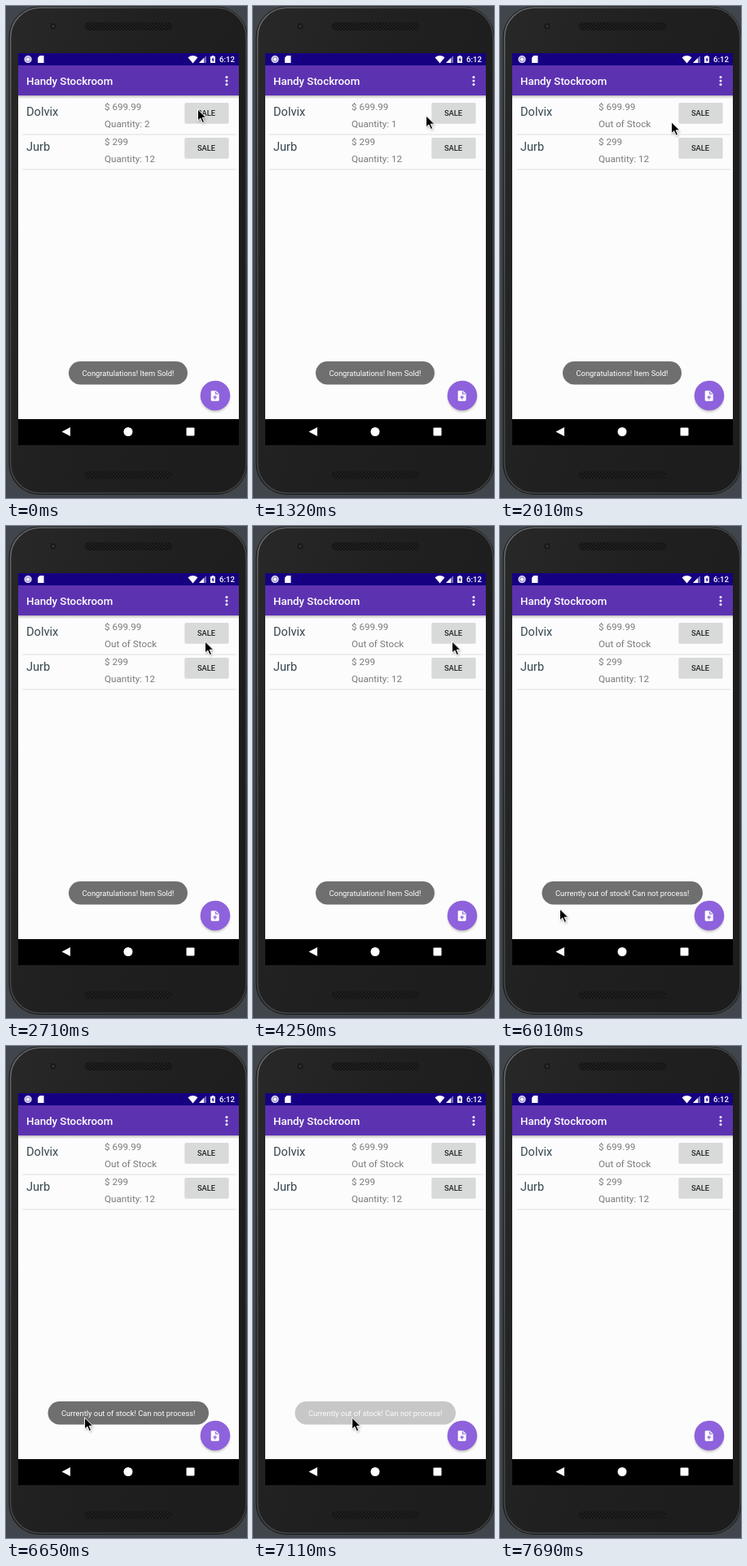
Recreate the animation shown at these times as an HTML page. Size 296x605 px, loop 8280 ms.

```html
<!DOCTYPE html>
<html lang="en">
<meta charset="utf-8">
<title>Inventory demo</title>
<style>
  html, body { margin: 0; width: 100%; height: 100%; overflow: hidden; background: #40464b; }
  svg { display: block; width: 296px; height: 605px; font-family: Roboto, sans-serif; }
  .name { font-size: 14.6px; fill: #37474f; }
  .detail { font-size: 11.7px; fill: #7a7a7a; }
  .sale { font-size: 9.3px; font-weight: 500; fill: #222; text-anchor: middle; }
  .toast text { font-size: 9.4px; fill: #fff; text-anchor: middle; }
  .toast rect { fill: #6f6f6f; }
</style>
<svg viewBox="0 0 296 605">
  <defs>
    <pattern id="mesh" width="4" height="4" patternUnits="userSpaceOnUse">
      <path d="M0 0h4v4h-4z" fill="#131313"/>
      <path d="M0 0l4 4M4 0l-4 4" stroke="#232323" stroke-width=".8"/>
    </pattern>
    <linearGradient id="shade" x2="0" y2="1">
      <stop stop-color="#000" stop-opacity=".24"/>
      <stop offset="1" stop-color="#000" stop-opacity="0"/>
    </linearGradient>
    <linearGradient id="rim" x2="1" y2="1">
      <stop stop-color="#6a6c6d"/>
      <stop offset=".3" stop-color="#48494a"/>
      <stop offset="1" stop-color="#3c3d3e"/>
    </linearGradient>
    <linearGradient id="body" x2="1" y2=".5">
      <stop stop-color="#282828"/>
      <stop offset=".5" stop-color="#202020"/>
      <stop offset="1" stop-color="#1d1d1d"/>
    </linearGradient>
    <filter id="soft" x="-50%" y="-50%" width="200%" height="200%"><feGaussianBlur stdDeviation="1.6"/></filter>
  </defs>

  <!-- phone -->
  <rect x="3.5" y=".5" width="293" height="600.5" rx="38" fill="#191919"/>
  <rect x="5.5" y="2" width="289.5" height="597" rx="36.5" fill="url(#body)" stroke="url(#rim)" stroke-width="1.6"/>
  <circle cx="58" cy="25" r="4.5" fill="#191919" stroke="#2c2c2c"/>
  <circle cx="58" cy="25" r="1.7" fill="#343434"/>
  <rect x="97" y="20.5" width="107" height="9" rx="4.5" fill="url(#mesh)" stroke="#191919"/>
  <rect x="97" y="572.5" width="107" height="8.5" rx="4.2" fill="url(#mesh)" stroke="#191919"/>

  <!-- screen -->
  <path d="M15 58h271v482h-271z" fill="#000"/>
  <path d="M15 73h271v435h-271z" fill="#fcfcfc"/>
  <path d="M15 58h271v15h-271z" fill="#160082"/>
  <path d="M15 73h271v37h-271z" fill="#5c32b1"/>
  <path d="M15 110h271v4h-271z" fill="url(#shade)"/>

  <g fill="#fff">
    <!-- status bar -->
    <circle cx="27" cy="65.5" r="4" fill="#a9a3d3" stroke="#f1effa" stroke-width="1.2"/>
    <circle cx="27" cy="65.5" r="1.8"/>
    <path d="M41.5 61h5v9h-7.5v-6.5z"/>
    <path d="M223.500 63.300q6-4.600 12 0l-6 7.200z"/>
    <path d="M246 61v9h-9z" opacity=".4"/>
    <path d="M243 64v6h-6z"/>
    <path d="M252.700 61h2.600v1h1.700v8h-6v-8h1.700z"/>
    <path d="M254.700 62.800l-2.300 3.700h1.400v2.700l2-3.600h-1.300z" fill="#160082"/>
    <text x="262" y="69" font-size="9.700" font-weight="500">6:12</text>
    <!-- toolbar -->
    <text x="25" y="97" font-size="13.300" font-weight="500">Handy Stockroom</text>
    <circle cx="271" cy="87.500" r="1.500"/>
    <circle cx="271" cy="92" r="1.500"/>
    <circle cx="271" cy="96.500" r="1.500"/>
    <!-- navigation -->
    <path d="M79 518v11l-10.500-5.500z"/>
    <circle cx="150" cy="523.500" r="5.500"/>
    <rect x="221.500" y="518.500" width="10" height="10" rx="1"/>
  </g>

  <g id="rows"></g>
  <g id="toasts"></g>

  <!-- add button -->
  <circle cx="257" cy="481.5" r="17.500" opacity=".25" filter="url(#soft)"/>
  <circle cx="257" cy="479" r="18.300" fill="#8e62dc"/>
  <path d="M253 473h5l3.700 3.700v7.800q0 1.300-1.300 1.300h-7.400q-1.300 0-1.300-1.300v-10.200q0-1.300 1.300-1.300z" fill="#fff"/>
  <path d="M257.700 473.800v3.200h3.200M256.700 478.700v5M254.200 481.200h5" fill="none" stroke="#8e62dc" stroke-width="1.200"/>

  <g id="cursor">
    <path d="M1 2v14l3.300-3 2.400 5.300 2.300-1-2.300-5.200h4.600z" opacity=".3" filter="url(#soft)"/>
    <path d="M0 0v14l3.300-3 2.400 5.500 2.400-1-2.400-5.300h4.600z" stroke="#fff"/>
  </g>
</svg>
<script>
  const LOOP = 8280;
  const byId = id => document.getElementById(id);

  const row = (y, name, price, quantity) => `
    <text class="name" x="25" y="${y + 25}">${name}</text>
    <text class="detail" x="121" y="${y + 18}">$ ${price}</text>
    <text class="detail quantity" x="121" y="${y + 39}">${quantity}</text>
    <rect x="219.5" y="${y + 9.5}" width="54" height="25.5" rx="1.5" fill="#000" opacity=".1"/>
    <rect x="219.5" y="${y + 9}" width="54" height="25" rx="1.5" fill="#d8d9d9"/>
    <text class="sale" x="246" y="${y + 25}">SALE</text>
    <path d="M20 ${y + 48}h263" stroke="#eee" stroke-width="2"/>`;

  const toast = (x, width, message) => `
    <g class="toast">
      <rect x="${x}" y="437" width="${width}" height="28.5" rx="14.25"/>
      <text x="${x + width / 2}" y="455">${message}</text>
    </g>`;

  byId("rows").innerHTML =
    row(110, "Dolvix", "699.99", "Quantity: 2") + row(153, "Jurb", "299", "Quantity: 12");
  byId("toasts").innerHTML =
    toast(77, 146, "Congratulations! Item Sold!") +
    toast(51.5, 197.5, "Currently out of stock! Can not process!");

  const stock = document.querySelector(".quantity");
  const [sold, empty] = document.querySelectorAll(".toast");
  const cursor = byId("cursor");

  // Pointer path: time, x, y of the tip
  const path = [
    [0, 235.5, 127], [60, 235, 128], [350, 235, 128], [560, 222, 143], [1040, 173, 152],
    [1150, 173, 152], [1320, 212.5, 135], [1550, 239, 133], [1670, 239, 133],
    [1800, 236, 131], [2180, 190, 152], [2530, 212, 142], [2590, 222, 143], [2710, 244.5, 142],
    [5310, 244.5, 142], [5600, 180, 270], [5900, 86, 450], [6010, 73.5, 471], [6180, 71, 457],
    [7110, 121.5, 457], [7300, 160, 485], [7690, 298, 607], [LOOP, 298, 607]
  ];

  function pointerAt(t) {
    const i = path.findIndex(p => p[0] > t);
    const [t0, x0, y0] = path[i - 1], [t1, x1, y1] = path[i];
    const k = (t - t0) / (t1 - t0);
    return [x0 + (x1 - x0) * k, y0 + (y1 - y0) * k];
  }

  function fade(t, start, duration) {
    const k = Math.min(1, Math.max(0, (t - start) / duration));
    return (1 - Math.cos(Math.PI * k)) / 2;
  }

  const start = performance.now();

  function draw() {
    const t = (performance.now() - start) % LOOP;
    stock.textContent = t < 410 ? "Quantity: 2" : t < 1730 ? "Quantity: 1" : "Out of Stock";
    sold.setAttribute("opacity", 1 - fade(t, 5030, 170));
    empty.setAttribute("opacity", fade(t, 4865, 320) * (1 - fade(t, 6925, 320)));
    cursor.setAttribute("transform", `translate(${pointerAt(t)})`);
    requestAnimationFrame(draw);
  }
  draw();
</script>
</html>
```
